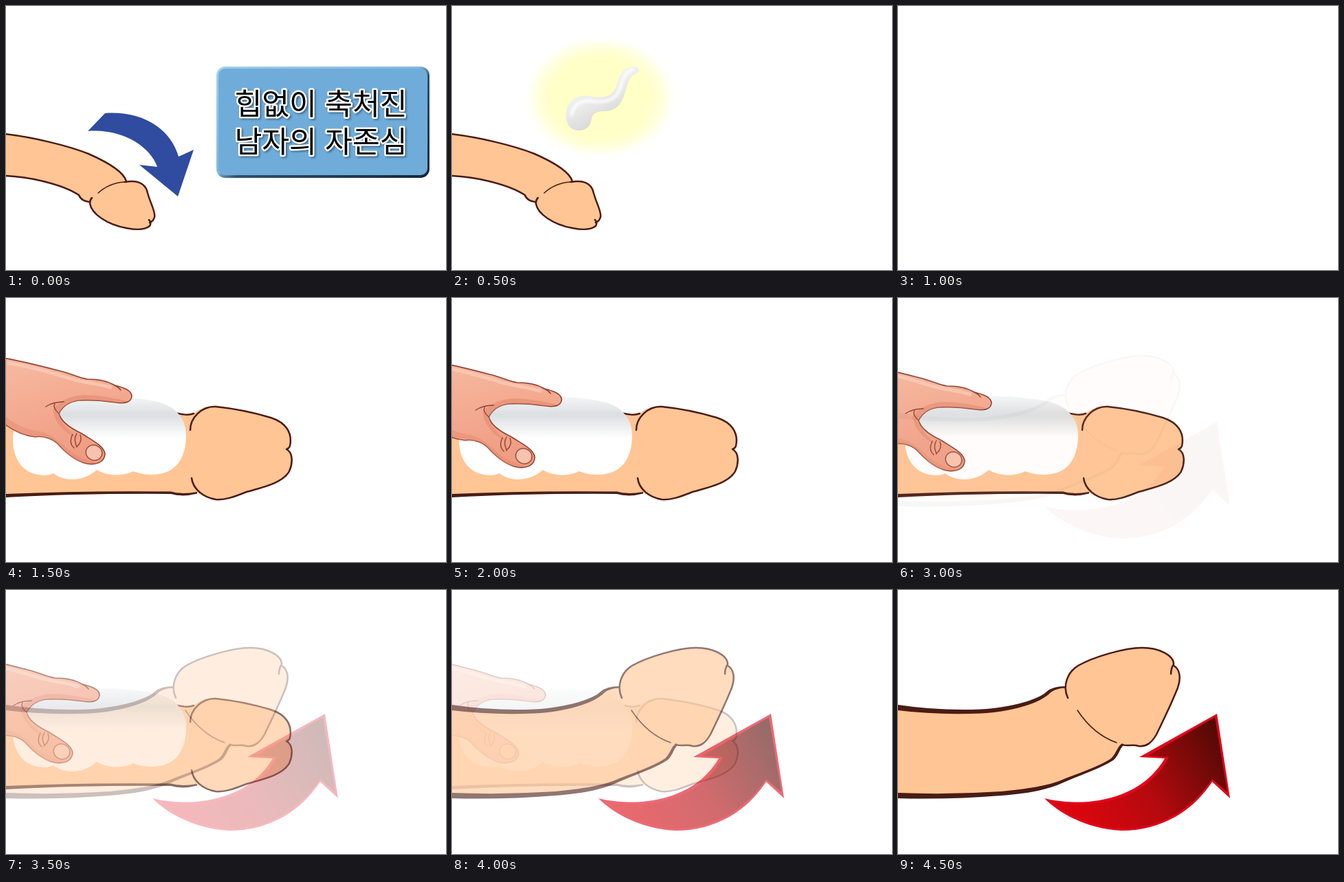
An HTML page that plays this animation: 640 px wide and 384 px high, repeating every 6.5 s.

```html
<!DOCTYPE html>
<html lang="ko">
<head>
<meta charset="utf-8">
<style>
html, body { margin: 0; width: 100%; height: 100%; overflow: hidden; background: #fff; }
svg { display: block; width: 100vw; height: 100vh; }
.skin { fill: #ffc594; }
.line { fill: none; stroke: #4a1c14; stroke-width: 2.5; stroke-linecap: round; stroke-linejoin: round; }
.thin { stroke-width: 1.6; }
.taper { fill: #4a1c14; }
.crease { fill: none; stroke: #8f4130; stroke-width: 1.4; stroke-linecap: round; stroke-linejoin: round; }
.sign { font: 500 43.3px "Noto Sans CJK KR", "Noto Sans CJK", "Noto Sans", sans-serif; text-anchor: middle; }
.halo { fill: #fff; stroke: #fff; stroke-width: 5; stroke-linejoin: round; }
</style>
</head>
<body>
<svg viewBox="0 0 640 384" xmlns="http://www.w3.org/2000/svg">
  <defs>
    <radialGradient id="glowFill">
      <stop offset="0" stop-color="#ffffc4"/>
      <stop offset=".64" stop-color="#ffffc8"/>
      <stop offset=".82" stop-color="#ffffe2"/>
      <stop offset="1" stop-color="#fff" stop-opacity="0"/>
    </radialGradient>
    <linearGradient id="dropFill" x1="0" y1="0" x2=".6" y2="1">
      <stop offset="0" stop-color="#fafafa"/>
      <stop offset=".55" stop-color="#ececec"/>
      <stop offset="1" stop-color="#cfcfcf"/>
    </linearGradient>
    <linearGradient id="creamFill" gradientUnits="userSpaceOnUse" x1="0" y1="142" x2="0" y2="204">
      <stop offset="0" stop-color="#f5f7f8"/>
      <stop offset=".45" stop-color="#dcdfe1"/>
      <stop offset=".7" stop-color="#ebedee"/>
      <stop offset="1" stop-color="#fff"/>
    </linearGradient>
    <linearGradient id="handFill" gradientUnits="userSpaceOnUse" x1="30" y1="90" x2="70" y2="240">
      <stop offset="0" stop-color="#f6b89f"/>
      <stop offset=".5" stop-color="#f3aa90"/>
      <stop offset="1" stop-color="#ee9c82"/>
    </linearGradient>
    <linearGradient id="redFill" gradientUnits="userSpaceOnUse" x1="270" y1="335" x2="465" y2="215">
      <stop offset="0" stop-color="#d9060e"/>
      <stop offset=".45" stop-color="#b40a0e"/>
      <stop offset="1" stop-color="#560a06"/>
    </linearGradient>
    <linearGradient id="rim" x1="0" y1="0" x2="1" y2="1">
      <stop offset="0" stop-color="#a3d0ee"/>
      <stop offset=".48" stop-color="#86b9de"/>
      <stop offset=".54" stop-color="#31516c"/>
      <stop offset="1" stop-color="#14273a"/>
    </linearGradient>
    <filter id="soft" x="-10%" y="-20%" width="120%" height="140%"><feGaussianBlur stdDeviation="1.4"/></filter>
  </defs>

  <g id="limp">
    <path class="skin" d="M-3 186C40 191 90 203 120 215C145 226 171 240 175 255C191 253 203 258 206 272C210 287 218 300 216 306L210 319C204 325 190 326 175 323C150 318 128 303 122 286C116 284 110 284 108 277C80 258 30 248-3 247Z"/>
    <path class="line" d="M-3 186C40 191 90 203 120 215C145 226 171 240 175 255"/>
    <path class="line" d="M-3 247C30 248 80 258 106 275C109 283 116 284 121 285"/>
    <path class="line" d="M173 256C191 253 203 258 206 272C210 287 218 300 216 307C215 311 212 314 209 315M208 311Q212 315 209 320C203 325 190 326 175 323C147 318 124 302 122 287Q122 282 125 279" stroke-width="2"/>
    <path class="line thin" d="M134 272C145 262 158 257 172 256"/>
  </g>

  <g id="intro">
    <path fill="#304ca0" d="M119 182L144 156C200 152 240 180 251 219L273 209L250 277L194 231L220 234C210 205 170 178 119 182Z"/>
    <rect x="306" y="88" width="310" height="162" rx="13" fill="url(#rim)"/>
    <rect x="309" y="91" width="304" height="155" rx="10" fill="#6facd9"/>
    <g id="label"></g>
  </g>

  <g id="drop">
    <ellipse cx="216" cy="133" rx="115" ry="92" fill="url(#glowFill)"/>
    <path fill="url(#dropFill)" d="M166 163C164 142 178 128 200 131C215 134 228 134 236 123C244 110 242 92 262 88C270 87 274 93 270 97C258 101 256 112 251 128C246 145 236 153 222 153C212 153 204 156 203 164C202 175 195 181 184 181C174 181 167 174 166 163Z"/>
    <path fill="none" stroke="#fff" stroke-opacity=".7" stroke-width="5" stroke-linecap="round" d="M174 158C177 143 187 137 200 138C222 142 237 138 244 121C248 108 250 96 263 92" filter="url(#soft)"/>
  </g>

  <g id="flat">
    <path class="skin" d="M0 168L250 167Q262 172 273 168C281 161 292 157 305 158C335 161 365 168 385 174C405 181 417 195 413 216L408 220C418 224 418 240 412 252C402 270 370 276 350 282C330 290 318 294 305 293C295 292 285 288 278 283Q260 290 240 284L0 287Z"/>
    <path class="line" d="M240 166C258 170 266 171 273 168"/>
    <path class="taper" d="M0 285Q110 280 240 281.500Q255 286 278 282L278 284.500Q257 290 240 285Q110 284 0 290Z"/>
    <path class="line" d="M268 192C268 174 285 157 305 158C335 161 365 168 385 174C407 181 417 196 413 215Q412 219 408 220C418 225 417 241 412 252C402 270 370 276 350 282C330 290 318 294 305 293C287 290 272 278 270 262"/>
    <path fill="url(#creamFill)" d="M10 205C10 235 25 257 55 258Q63 258 69 255C84 268 114 267 132 250C146 259 170 260 185 252C202 259 225 259 240 250C256 240 262 220 262 200C262 170 240 154 215 150C180 142 110 140 80 146C40 152 10 170 10 205Z"/>
    <g id="hand">
      <path fill="url(#handFill)" stroke="#8f4130" stroke-width="1.6" stroke-linejoin="round" d="M-5 87C25 92 55 100 78 106C95 110 105 116 118 118C135 118 150 122 158 127C170 130 183 134 183 143C182 152 172 154 160 152C140 149 120 148 105 149C92 151 82 158 77 168C80 180 95 190 110 197C125 207 143 215 144 227C143 240 130 243 118 241C104 238 90 228 78 215C70 205 55 200 42 202C25 200 10 193-5 181Z"/>
      <path fill="#e58c73" opacity=".65" d="M177 150C160 146 135 141 112 141C90 143 74 152 68 163C72 184 88 198 104 204C92 193 79 181 77 168C82 158 92 151 105 149C130 147 155 152 166 152Z"/>
      <path fill="#e58c73" opacity=".5" d="M-5 169C15 186 35 193 50 194C69 199 80 211 91 221C103 230 116 236 132 239C107 246 88 226 78 215C70 205 55 200 42 202C25 200 10 193-5 181Z"/>
      <path fill="none" stroke="#fbcdb8" stroke-opacity=".75" stroke-width="5" stroke-linecap="round" d="M4 95C35 99 62 108 84 114C106 123 130 123 152 130"/>
      <path class="crease" d="M84 151C72 151 64 154 58 158M77 168C70 162 69 157 71 154M97 198C93 205 93 213 99 218M103 197C98 205 101 211 103 217M108 199C111 207 108 212 103 216M158 127Q164 130 167 134"/>
      <ellipse cx="128" cy="225" rx="12" ry="11" fill="#f8c3ae" stroke="#9a4937" stroke-width="1.4" transform="rotate(22 128 225)"/>
    </g>
  </g>

  <g id="bent">
    <path class="skin" d="M0 171Q60 178 120 176C165 174 205 162 219 148Q229 141 243 142C244 125 252 115 262 110C285 97 330 84 355 84C380 84 400 95 401 109C410 115 412 128 407 142C398 165 388 185 376 210C368 224 360 228 350 227C340 224 332 228 327 224C320 230 320 238 312 246C290 260 260 268 235 280C215 288 190 292 150 296Q75 301 0 299Z"/>
    <path class="taper" d="M0 167Q60 176 120 173.500C165 171 205 159 216 148Q225 140 243 140L243 142.500Q230 143 222 149C207 165 166 177 120 179.500Q55 182 0 175Z"/>
    <path class="taper" d="M0 295Q75 298 150 293C190 289 214 285 234 278C260 267 290 258 310 245C318 237 318 229 326 223L328 226C322 231 322 239 314 247C291 262 261 270 236 282C214 291 190 296 150 299Q75 305 0 303Z"/>
    <path class="line" d="M247 157C239 140 246 120 262 110C285 97 330 84 355 84C380 84 401 95 401 108Q397 114 397 122M401 110C410 115 412 128 407 142C398 165 388 185 376 210C368 224 360 228 350 227C340 224 333 228 327 225"/>
    <path class="line thin" d="M261 175C275 196 292 213 318 222"/>
    <path fill="#e2061a" d="M213 303C265 316 350 310 388 245L351 243L464 180L483 303L457 279C430 320 385 350 325 350C275 348 235 325 213 303Z"/>
    <path fill="url(#redFill)" d="M224 308C280 319 360 309 394 243L364 241L461 185L479 294L457 275C429 317 384 347 325 347C282 345 246 327 224 308Z"/>
  </g>
</svg>
<script>
const LOOP = 6500;
const $ = id => document.getElementById(id);
const layers = ["limp", "intro", "drop", "flat", "bent"];

// Each scene: start time, layer opacities, and hand progress from 0 to 1.
const scenes = [
  { at: 0, limp: 1, intro: 1 },
  { at: 500, limp: 1, drop: 1 },
  { at: 1000 },
  { at: 1500, flat: 1, slide: 0 },
  { at: 2000, flat: 1, slide: .5 },
  { at: 2500, flat: 1, slide: 1 },
  { at: 3000, flat: .97, bent: .03, slide: 1 },
  { at: 3500, flat: .65, bent: .28, slide: 1 },
  { at: 4000, flat: .27, bent: .6, slide: 1 },
  { at: 4500, bent: 1 }
];

function addLine(text, y) {
  const put = (attrs, dx) =>
    `<text class="sign" x="${458 + dx}" y="${y + dx}" ${attrs}>${text}</text>`;
  return put('fill="#18364f" stroke="#18364f" stroke-width="4" opacity=".6" filter="url(#soft)"', 2) +
    `<text class="sign halo" x="458" y="${y}">${text}</text>` + put('fill="#000"', 0);
}
$("label").innerHTML = addLine("힙없이 축처진", 158) + addLine("남자의 자존심", 213);

function draw(time) {
  const t = time % LOOP;
  const scene = scenes.filter(s => s.at <= t).pop();
  for (const id of layers) {
    const alpha = scene[id] || 0;
    $(id).setAttribute("opacity", alpha);
    $(id).style.display = alpha ? "" : "none";
  }
  const slide = scene.slide || 0;
  $("hand").setAttribute("transform", `translate(${-47 * slide} ${10 * slide})`);
}

const start = performance.now();
function tick(now) {
  draw(Math.max(0, now - start));
  requestAnimationFrame(tick);
}
draw(0);
requestAnimationFrame(tick);
</script>
</body>
</html>
```
